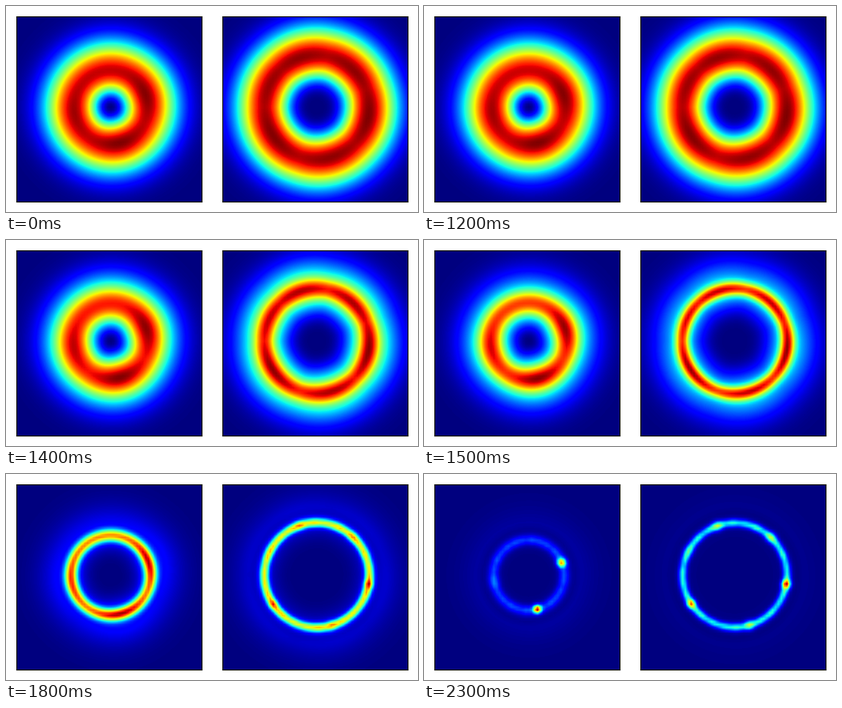
Write a matplotlib script that moves like this. It is 516 px wide and 258 px high and loops after 3.4 s.

```python
import numpy as np
import matplotlib.pyplot as plt
from matplotlib.animation import FuncAnimation

W, H, DPI = 516, 258, 100
FRAMES, INTERVAL = 34, 100
HOLD, LAST = 10, 13          # frames at rest, then steps of collapse
N = 64                       # grid points per side
CELL = 0.9 * H / N           # grid spacing in pixels
SIGMA = 46.0                 # beam waist in pixels


def smoothstep(x, a, b):
    t = np.clip((x - a) / (b - a), 0, 1)
    return t * t * (3 - 2 * t)


def gauss(d, width):
    return np.exp(-(d / width) ** 2)


axis = (np.arange(N) - N / 2) * CELL
X, Y = np.meshgrid(axis, axis)
R, THETA = np.hypot(X, Y), np.arctan2(Y, X)


class Vortex:
    """Vortex beam that self-focuses into a ring and breaks into hot spots."""

    def __init__(self, charge, onset, core, spread, swell, shrink,
                 breakup, fade, spots, seed):
        self.onset, self.core, self.spread = onset, core, spread
        self.swell, self.shrink = swell, shrink
        self.breakup, self.fade = breakup, fade
        self.spots = [(np.radians(deg), height) for deg, height in spots]
        self.peak = SIGMA * np.sqrt(charge)

        u = (R / SIGMA) ** 2
        self.base = (u / charge) ** charge * np.exp(charge - u)

        # the ring is slightly brighter where the spots will form
        lobes = [h ** 0.25 * gauss(np.angle(np.exp(1j * (THETA - a))), 0.55)
                 for a, h in self.spots]
        self.lobe = np.max(lobes, axis=0) / np.max(lobes)

        phases = np.random.default_rng(seed).uniform(0, 2 * np.pi, 3)
        self.bead = sum(np.cos(n * THETA + p) for n, p in zip((9, 16, 26), phases))

    def hot_spots(self, radius):
        total = 0
        for a, height in self.spots:
            d = np.hypot(X - radius * np.cos(a), Y - radius * np.sin(a))
            spot = gauss(d, 6.5 - 2.5 * height)
            total = total + height * spot / spot.max()
        return total

    def intensity(self, k):
        tail = 1 / (1 + (k / self.onset) ** 3.5)
        focus = 1 - tail
        split = smoothstep(k, *self.breakup)

        radius = self.peak + self.swell * focus - self.shrink * split
        width = self.core + self.spread * tail ** 1.35
        wings = tail * self.base * np.minimum(R / radius, 1) ** (5 * focus ** 4)
        wings *= 1 - 0.8 * focus ** 8 * gauss(R - radius - 13, 6)
        ring = focus * (1 - self.fade * split) * gauss(R - radius, width)
        ring *= 1 + 0.05 * split * self.bead

        depth = 0.06 + 0.2 * focus * (1 - split)
        light = (wings + ring) * (1 - depth * (1 - self.lobe))
        return np.clip(light + split * self.hot_spots(radius), 0, 1)


beams = [
    Vortex(charge=1, onset=5.4, core=5.2, spread=19, swell=4.5, shrink=6.5,
           breakup=(10, 13), fade=0.83,
           spots=[(-76, 0.82), (21, 0.58), (189, 0.07)], seed=3),
    Vortex(charge=2, onset=4.4, core=4.3, spread=15, swell=1, shrink=1,
           breakup=(6, 10), fade=0.6,
           spots=[(-10, 0.62), (213, 0.5), (46, 0.22), (110, 0.2),
                  (-74, 0.22), (153, 0.1)], seed=8),
]

fig = plt.figure(figsize=(W / DPI, H / DPI), dpi=DPI, facecolor="white")
images = []
for i, beam in enumerate(beams):
    ax = fig.add_axes([0.025 + 0.5 * i, 0.05, 0.45, 0.9])
    ax.set_xticks([])
    ax.set_yticks([])
    images.append(ax.imshow(beam.intensity(0), cmap="jet", vmin=0, vmax=1,
                            origin="lower", interpolation="bilinear",
                            aspect="auto"))


def update(i):
    k = min(max(i - HOLD, 0), LAST)
    for image, beam in zip(images, beams):
        image.set_data(beam.intensity(k))
    return images


anim = FuncAnimation(fig, update, frames=FRAMES, interval=INTERVAL,
                     repeat=True, repeat_delay=0, blit=False)
plt.show()
```
